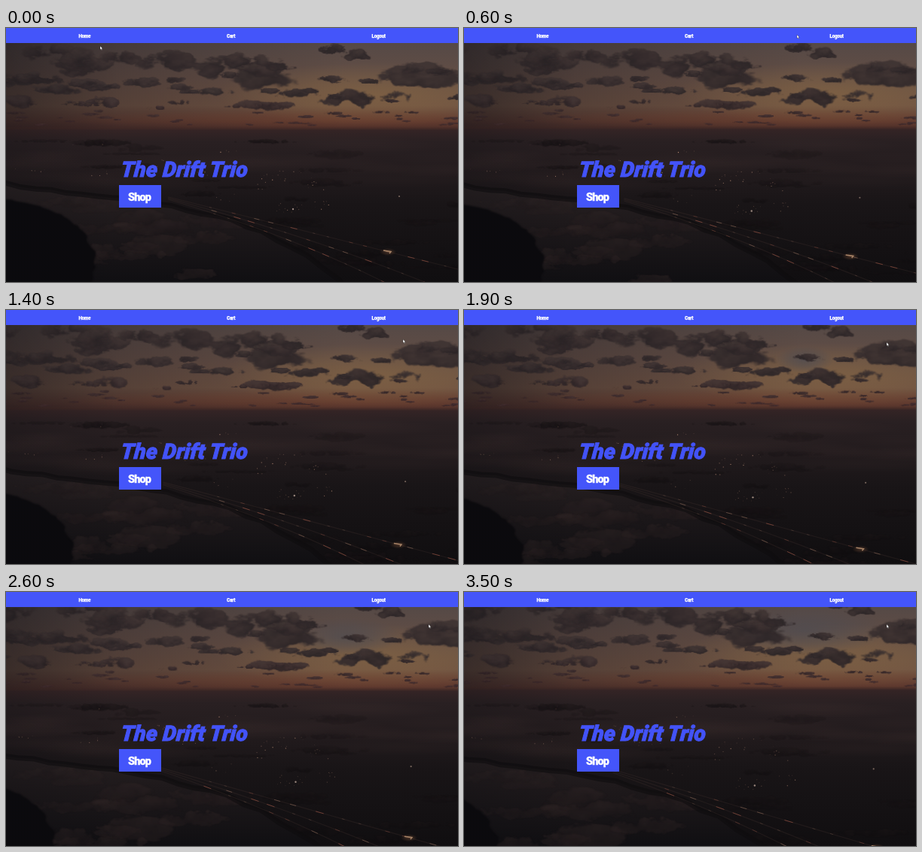
Recreate the animation shown at these times as an HTML page with a canvas. Size 600 px wide and 338 px high, loop 3.6 s.

```html
<!DOCTYPE html>
<html lang="en">
<head>
<meta charset="utf-8">
<title>Shop landing page</title>
<style>
  html, body { margin: 0; width: 100%; height: 100%; overflow: hidden; background: #1a171a; }
  canvas, svg { position: absolute; left: 0; top: 0; width: 600px; height: 338px; display: block; }
  text { font-family: Roboto, Inter, sans-serif; font-weight: 900; fill: #fff; }
  .nav { font-size: 6.3px; letter-spacing: -.3px; text-anchor: middle; stroke: #fff; stroke-width: .25px; }
  .title { font-size: 28.5px; letter-spacing: .1px; font-style: italic; fill: #4353f8; stroke: #4353f8; stroke-width: 1px; }
  .shop { font-size: 14.5px; letter-spacing: -.9px; text-anchor: middle; stroke: #fff; stroke-width: .3px; }
</style>
</head>
<body>
<canvas id="view" width="600" height="338"></canvas>
<svg viewBox="0 0 600 338">
  <rect width="600" height="20" fill="#4455fa"/>
  <text class="nav" x="104.3" y="12.5">Home</text>
  <text class="nav" x="298.6" y="12.5">Cart</text>
  <text class="nav" x="494.6" y="12.5">Logout</text>
  <text class="title" transform="translate(152 198) skewX(-5)">The Drift Trio</text>
  <rect x="150" y="209" width="56" height="30" fill="#4455fa"/>
  <text class="shop" x="177" y="229.6">Shop</text>
  <path id="cursor" d="M0 0V4.8L1.1 3.8 1.9 5.4 2.7 5 1.9 3.4H3.4Z" fill="#fff" stroke="#111" stroke-width=".3"/>
</svg>
<script>
const LOOP = 3600, STEP = 100, W = 600, H = 338, HORIZON = 133, TAU = Math.PI * 2;
const ctx = document.getElementById('view').getContext('2d');
const cursor = document.getElementById('cursor');

const clamp = v => Math.max(0, Math.min(1, v));
const smooth = v => { v = clamp(v); return v * v * (3 - 2 * v); };
const mix = (a, b, u) => a + (b - a) * u;
const repeat = (n, make) => Array.from({ length: n }, (_, i) => make(i));

function hash(x, y) {
  let v = Math.imul(x, 374761393) + Math.imul(y, 668265263);
  v = Math.imul(v ^ (v >>> 13), 1274126177);
  return ((v ^ (v >>> 16)) >>> 0) / 4294967296;
}

let drawn = 0;
const rnd = () => hash(++drawn, 97);

function noise(x, y) {
  const i = Math.floor(x), j = Math.floor(y), u = smooth(x - i), v = smooth(y - j);
  return mix(mix(hash(i, j), hash(i + 1, j), u), mix(hash(i, j + 1), hash(i + 1, j + 1), u), v);
}

function fbm(x, y) {
  let sum = 0;
  for (let o = 0, amp = .5; o < 4; o++, amp /= 2, x *= 2.1, y *= 2.1) sum += amp * noise(x, y);
  return sum / .9375;
}

// An ellipse eaten away by noise, darker below than on top
function puff(w, h, dark, light, seed) {
  const c = document.createElement('canvas');
  c.width = Math.ceil(w * 1.4);
  c.height = Math.ceil(h * 1.5);
  const g = c.getContext('2d'), img = g.createImageData(c.width, c.height);
  for (let y = 0, k = 0; y < c.height; y++) {
    for (let x = 0; x < c.width; x++, k += 4) {
      const u = (x + .5 - c.width / 2) / (w / 2), v = (y + .5 - c.height / 2) / (h / 2);
      const n = fbm(x / (h * .7 + 3) + seed * 17, y / (h * .42 + 2) + seed * 7);
      const body = .85 - u * u - v * v * (v > 0 ? 1.25 : .9);
      const edge = clamp((1.4 - Math.max(Math.abs(u), Math.abs(v))) * 6);
      const tone = clamp(.45 - v * .3 + (n - .5) * 1.6);
      for (let b = 0; b < 3; b++) img.data[k + b] = mix(dark[b], light[b], tone);
      img.data[k + 3] = 245 * edge * smooth((body + (n - .5) * 2.6) / .45);
    }
  }
  g.putImageData(img, 0, 0);
  return c;
}

// The leading clouds: x, y, width, height
const lead = [
  [95, 40, 46, 27], [40, 68, 88, 17], [130, 100, 46, 16], [70, 82, 60, 14], [20, 98, 48, 19],
  [215, 44, 88, 32], [278, 52, 52, 34], [343, 64, 80, 42], [345, 104, 74, 15],
  [384, 88, 50, 15], [432, 29, 46, 16], [475, 93, 116, 25], [553, 64, 102, 33]
];
const dark = [39, 33, 36], light = [63, 52, 51];

const clouds = repeat(95, () => {
  const up = 4 + 98 * rnd() ** 1.8, w = (11 + up * .42) * (.6 + rnd());
  return [-70 + 690 * rnd() ** (1 + up / 90), HORIZON - up, w, 2.5 + w * up * .0035];
}).concat(lead).map(([x, y, w, h], i) => {
  const red = clamp(1 - (HORIZON - y) / 40) * 14;
  return { x, y, img: puff(w * 1.08, h * 1.08, [dark[0] + red, dark[1], dark[2]], [light[0] + red, light[1], light[2]], i + 1) };
}).sort((a, b) => b.y - a.y);

const reflections = repeat(16, i => ({
  x: 20 + rnd() * 340, y: 228 + rnd() * 105,
  img: puff(60 + rnd() * 70, 14 + rnd() * 18, [30, 24, 26], [48, 37, 37], i + 200)
}));

const fields = repeat(46, i => ({
  x: rnd() * 640, y: 150 + rnd() * 175, a: .25 + rnd() * .4,
  img: puff(30 + rnd() * 70, 4 + rnd() * 9, [13, 11, 13], [27, 22, 23], i + 300)
}));

const mists = repeat(20, () => ({ x: rnd() * 640 - 20, y: 143 + rnd() * 65, w: 50 + rnd() * 90, a: .05 + rnd() * .1 }));

// Town lights stay where the noise is high
const lights = repeat(1100, () => ({ x: rnd() * 640 - 20, y: 155 + rnd() * 90, r: .35 + rnd() * .4, a: .25 + .65 * rnd() ** 2, p: rnd() * TAU }))
  .filter(l => l.y > shoreY(l.x) - 110 && l.y < shoreY(l.x) - 22 && noise(l.x / 42 + 5, l.y / 15) > .64);

const path = [[0, 125, 24], [300, 494, 182], [600, 442, 9], [900, 407, 1], [1400, 527, 39], [1900, 561, 43], [LOOP, 561, 43]];

function shoreY(x) { return 208 + .12 * x + 77 * (Math.max(0, x) / 445) ** 4.5; }
function roadY(x, lane) { return 171 + .25 * x + lane * 15 * (x / 450) ** 3; }

// The ground spreads out from the vanishing point as the camera flies forward.
function ground(x, y, t) {
  const s = 1 / (1 - .00035 * t * (y - HORIZON));
  return [349 + (x - 349) * s, HORIZON + (y - HORIZON) * s, s];
}

// Clouds drift right, faster the higher they hang.
function sky(x, y, t) {
  const up = HORIZON - y;
  return [x + t * (2.2 + up * .157), y - t * (1 + up * .025)];
}

function fade(x0, y0, x1, y1, ...stops) {
  const g = ctx.createLinearGradient(x0, y0, x1, y1);
  stops.forEach(([at, color]) => g.addColorStop(at, color));
  return g;
}

function glow(x, y, rx, ry, rgb, alpha) {
  ctx.save();
  ctx.translate(x, y);
  ctx.scale(rx, ry);
  const g = ctx.createRadialGradient(0, 0, 0, 0, 0, 1);
  [1, .6, 0].forEach((k, i) => g.addColorStop(i / 2, `rgba(${rgb},${alpha * k})`));
  ctx.fillStyle = g;
  ctx.fillRect(-1, -1, 2, 2);
  ctx.restore();
}

function stamp(img, x, y, s = 1) {
  ctx.drawImage(img, x - img.width * s / 2, y - img.height * s / 2, img.width * s, img.height * s);
}

function dot(x, y, r, color) {
  ctx.fillStyle = color;
  ctx.beginPath();
  ctx.arc(x, y, r, 0, TAU);
  ctx.fill();
}

function trace(points) {
  ctx.beginPath();
  points.forEach(([x, y]) => ctx.lineTo(x, y));
}

function stroke(points, width, color) {
  trace(points);
  ctx.lineWidth = width;
  ctx.strokeStyle = color;
  ctx.stroke();
}

function drawSky(t) {
  ctx.fillStyle = fade(0, 20, 0, 136, [0, '#554946'], [.4, '#634e45'], [.72, '#6e5242'], [.9, '#5c392f'], [1, '#472b27']);
  ctx.fillRect(0, 0, W, 150);
  ctx.fillStyle = fade(0, 0, W, 0, [0, 'rgba(32,27,31,.5)'], [.4, 'rgba(34,28,32,.22)'], [.75, 'rgba(40,30,30,0)']);
  ctx.fillRect(0, 0, W, 150);
  glow(490, 88 - t, 210, 42, '140,108,68', .5);
  glow(430, 122 - 1.6 * t, 360, 14, '122,68,46', .3);
  const clear = clamp((t - 1.8) / 1.6);
  if (clear) glow(452, 67 - 16 * clear, 34 + 75 * clear, 17 + 16 * clear, '77,75,81', .75);
  for (const c of clouds) stamp(c.img, ...sky(c.x, c.y, t), 1 + .012 * t);
}

function drawWater(t) {
  const bank = repeat(34, i => ground(i * 20 - 200, shoreY(i * 20 - 200) + 4 * noise(i, 3) - 2, t));
  ctx.save();
  trace([...bank, [-400, 500]]);
  ctx.fillStyle = fade(0, 208, 0, H, [0, '#292223'], [.4, '#1e191b'], [1, '#100f12']);
  ctx.fill();
  ctx.clip();
  ctx.globalAlpha = .5;
  for (const r of reflections) {
    const [x, y, s] = ground(r.x, r.y, t);
    stamp(r.img, x, y, s);
  }
  ctx.restore();
  stroke(bank, 7, 'rgba(14,12,14,.6)');
}

function drawRoads(t) {
  for (let lane = 0; lane < 3; lane++) {
    const at = x => ground(x, roadY(x, lane), t);
    stroke(repeat(21, i => at(215 + i * 20)), 1.2, 'rgba(66,51,48,.3)');
    for (let i = 0; i < 13; i++) {
      const x = 270 + (i * .618 + lane * .3 + t * .03) % 1 * 330;
      stroke([at(x), at(x + 3 + i % 4 * 2)], .9, `rgba(168,${i % 2 ? 92 : 128},${i % 2 ? 74 : 106},${.25 + i % 4 * .13})`);
    }
  }
}

function drawGround(t) {
  const top = HORIZON - 1.6 * t - 2;
  ctx.fillStyle = fade(0, top, 0, H, [0, 'rgba(70,42,36,0)'], [.025, '#342425'], [.1, '#292022'], [.3, '#221b1d'], [.5, '#191517'], [1, '#100e10']);
  ctx.fillRect(0, top, W, H);
  for (const f of fields) {
    const [x, y, s] = ground(f.x, f.y, t);
    ctx.globalAlpha = f.a;
    stamp(f.img, x, y, s);
  }
  ctx.globalAlpha = 1;
  drawWater(t);
  drawRoads(t);
  for (const m of mists) {
    const [x, y, s] = ground(m.x, m.y, t);
    glow(x, y, m.w * s, 10 * s, '70,52,50', m.a + t * .014);
  }
  for (const l of lights) {
    const [x, y, s] = ground(l.x, l.y, t);
    dot(x, y, l.r * s, `rgba(209,160,132,${l.a * (.75 + .25 * Math.sin(t * 9 + l.p)) * (1 - t * .1)})`);
  }
  dot(...ground(381, 241, t).slice(0, 2), 1.2, 'rgba(198,174,160,.75)');
  dot(...ground(522, 224, t).slice(0, 2), 1.1, 'rgba(182,155,139,.6)');
  const [x, y] = ground(507, 298, t);
  glow(x, y, 11, 5, '150,98,66', .35);
  stroke([[x - 6, y - 2], [x + 4, y - .5], [x + 2, y + 2]], 1.5, '#a98568');
}

// The near hillside passes faster than the valley floor.
function drawHill(t) {
  const edge = repeat(40, i => {
    const a = i / 39 * 1.9 - 1.57, r = 1 + .05 * (noise(i * .8, 11) - .5);
    return [-20 - 21 * t + 138 * r * Math.cos(a), 311 + 8 * t + 84 * r * Math.sin(a)];
  });
  ctx.filter = 'blur(1px)';
  trace([...edge, [90 - 21 * t, 380], [-120, 380], [-120, 228 + 8 * t]]);
  ctx.fillStyle = '#0b0a0d';
  ctx.fill();
  ctx.filter = 'none';
}

function drawCursor(ms) {
  const i = path.findIndex((p, n) => n && ms <= p[0]);
  const [t0, x0, y0] = path[i - 1], [t1, x1, y1] = path[i];
  const e = smooth((ms - t0) / (t1 - t0));
  cursor.setAttribute('transform', `translate(${mix(x0, x1, e)} ${mix(y0, y1, e)})`);
}

function draw(ms) {
  const t = ms / 1000;
  drawSky(t);
  drawGround(t);
  drawHill(t);
  ctx.fillStyle = fade(0, 0, W, 0, [0, 'rgba(10,10,14,.22)'], [.25, 'rgba(10,10,14,0)']);
  ctx.fillRect(0, 0, W, H);
  drawCursor(ms);
}

let shown = -1;
function tick() {
  const ms = Math.floor((performance.now() % LOOP) / STEP) * STEP;
  if (ms !== shown) draw(shown = ms);
  requestAnimationFrame(tick);
}
tick();
</script>
</body>
</html>
```
